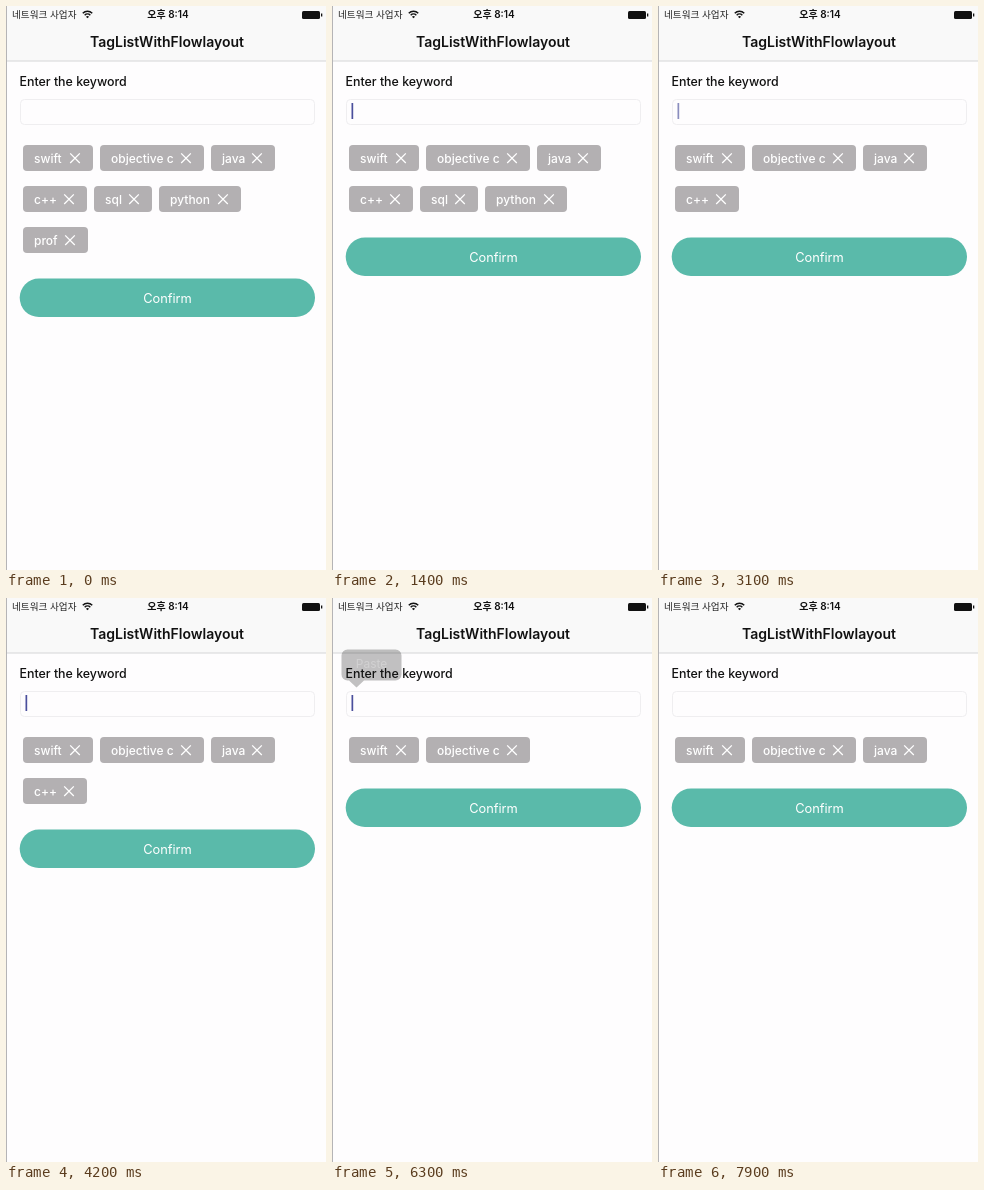
An HTML page with a canvas that plays this animation: 320x564 px, repeating every 8000 ms.

```html
<!DOCTYPE html>
<html lang="ko">
<head>
<meta charset="utf-8">
<title>Tag list</title>
<style>
  html, body { margin: 0; width: 100%; height: 100%; overflow: hidden; background: #fefdfe; }
  canvas { display: block; width: 320px; height: 564px; }
</style>
</head>
<body>
<canvas id="stage" width="320" height="564"></canvas>
<script>
const ctx = document.getElementById('stage').getContext('2d');
const LOOP = 8000;
const SANS = 'Inter, "Noto Sans CJK KR", "Noto Sans CJK JP", sans-serif';
const TEAL = '#5abaaa', GRAY = '#b3b0b2', INK = '#111';

// Each tag: label, left edge, row, width, time of removal.
const tags = [
  ['swift', 17, 0, 70, Infinity],
  ['objective c', 94, 0, 104, Infinity],
  ['java', 205, 0, 64, 5400],
  ['c++', 17, 1, 64, 4500],
  ['sql', 88, 1, 58, 3000],
  ['python', 153, 1, 82, 2000],
  ['prof', 17, 2, 65, 1400]
];
const ROW_PITCH = 41;
const PASTE_AT = 6400, ADD_AT = 7200;

const clamp = v => Math.max(0, Math.min(1, v));
const ramp = (t, from, to) => clamp((t - from) / (to - from));

function text(str, x, y, size, weight, color, align = 'left') {
  ctx.font = `${weight} ${size}px ${SANS}`;
  ctx.fillStyle = color;
  ctx.textAlign = align;
  ctx.fillText(str, x, y);
}

function roundRect(x, y, w, h, r) {
  ctx.beginPath();
  ctx.roundRect(x, y, w, h, r);
}

function statusBar() {
  text('네트워크 사업자', 6, 12, 9.6, 400, '#222');
  text('오후 8:14', 162, 12, 10, 600, INK, 'center');
  ctx.strokeStyle = INK;
  ctx.lineWidth = 1.5;
  for (const r of [4, 6.7]) {
    ctx.beginPath();
    ctx.arc(81.5, 12, r, -Math.PI * 0.75, -Math.PI * 0.25);
    ctx.stroke();
  }
  ctx.fillStyle = INK;
  ctx.beginPath();
  ctx.moveTo(81.5, 12.3);
  ctx.arc(81.5, 12.3, 2.2, -Math.PI * 0.75, -Math.PI * 0.25);
  ctx.fill();
  roundRect(296, 5, 18, 8, 1.5);
  ctx.fill();
  ctx.fillRect(315, 7.5, 1.3, 3);
}

function header() {
  ctx.fillStyle = '#f9f9f9';
  ctx.fillRect(0, 0, 320, 55);
  ctx.fillStyle = '#d6d5d7';
  ctx.fillRect(0, 54.5, 320, 1);
  statusBar();
  text('TagListWithFlowlayout', 161, 41, 14, 600, INK, 'center');
}

function caretAlpha(t) {
  if (t >= PASTE_AT && t < PASTE_AT + 400) return 1;
  const phase = t % 1000;
  return t < 100 ? 0 : ramp(phase, -40, 180) * (1 - ramp(phase, 500, 700));
}

function field(t) {
  text('Enter the keyword', 13.5, 80, 12.4, 500, INK);
  roundRect(14.5, 93.5, 294, 25, 4);
  ctx.strokeStyle = '#efeef0';
  ctx.lineWidth = 1;
  ctx.stroke();

  let caretX = 19.5;
  if (t >= PASTE_AT && t < ADD_AT) {
    text('java', 20, 110, 12, 400, INK);
    caretX = 21 + ctx.measureText('java').width;
  }
  ctx.globalAlpha = caretAlpha(t);
  ctx.fillStyle = '#4a4f9c';
  ctx.fillRect(caretX, 97, 1.7, 16);
  ctx.globalAlpha = 1;
}

function tag([label, x, row, w]) {
  const y = 139 + row * ROW_PITCH;
  roundRect(x, y, w, 26, 4);
  ctx.fillStyle = GRAY;
  ctx.fill();
  text(label, x + 11, y + 17.5, 12, 500, '#fff');
  const cx = x + w - 18, cy = y + 13.2, r = 4.8;
  ctx.strokeStyle = '#fff';
  ctx.lineWidth = 1.3;
  ctx.beginPath();
  ctx.moveTo(cx - r, cy - r);
  ctx.lineTo(cx + r, cy + r);
  ctx.moveTo(cx + r, cy - r);
  ctx.lineTo(cx - r, cy + r);
  ctx.stroke();
}

function confirmButton(rows) {
  const y = 190.6 + (rows - 1) * ROW_PITCH;
  roundRect(13.7, y, 295.3, 38.4, 19.2);
  ctx.fillStyle = TEAL;
  ctx.fill();
  text('Confirm', 161.5, y + 24, 12.8, 400, '#fff', 'center');
}

function pasteMenu(t) {
  const alpha = ramp(t, 5750, 5900) * (1 - ramp(t, 6160, 6360));
  if (!alpha) return;
  ctx.globalAlpha = alpha * 0.92;
  ctx.fillStyle = '#1c1b1c';
  roundRect(9.5, 51.5, 60, 31, 6);
  ctx.moveTo(17, 82.5);
  ctx.lineTo(24.5, 89.5);
  ctx.lineTo(32, 82.5);
  ctx.fill();
  text('Paste', 39.5, 70, 12, 400, '#fff', 'center');
  ctx.globalAlpha = 1;
}

function draw(t) {
  ctx.fillStyle = '#fefdfe';
  ctx.fillRect(0, 0, 320, 564);
  header();
  field(t);
  const shown = tags.filter(([label, , , , gone]) =>
    t < gone || (label === 'java' && t >= ADD_AT));
  shown.forEach(tag);
  confirmButton(1 + Math.max(...shown.map(item => item[2])));
  pasteMenu(t);
  ctx.fillStyle = '#b5b4b6';
  ctx.fillRect(0, 0, 1, 564);
}

function tick() {
  draw(performance.now() % LOOP);
  requestAnimationFrame(tick);
}
tick();
</script>
</body>
</html>
```
